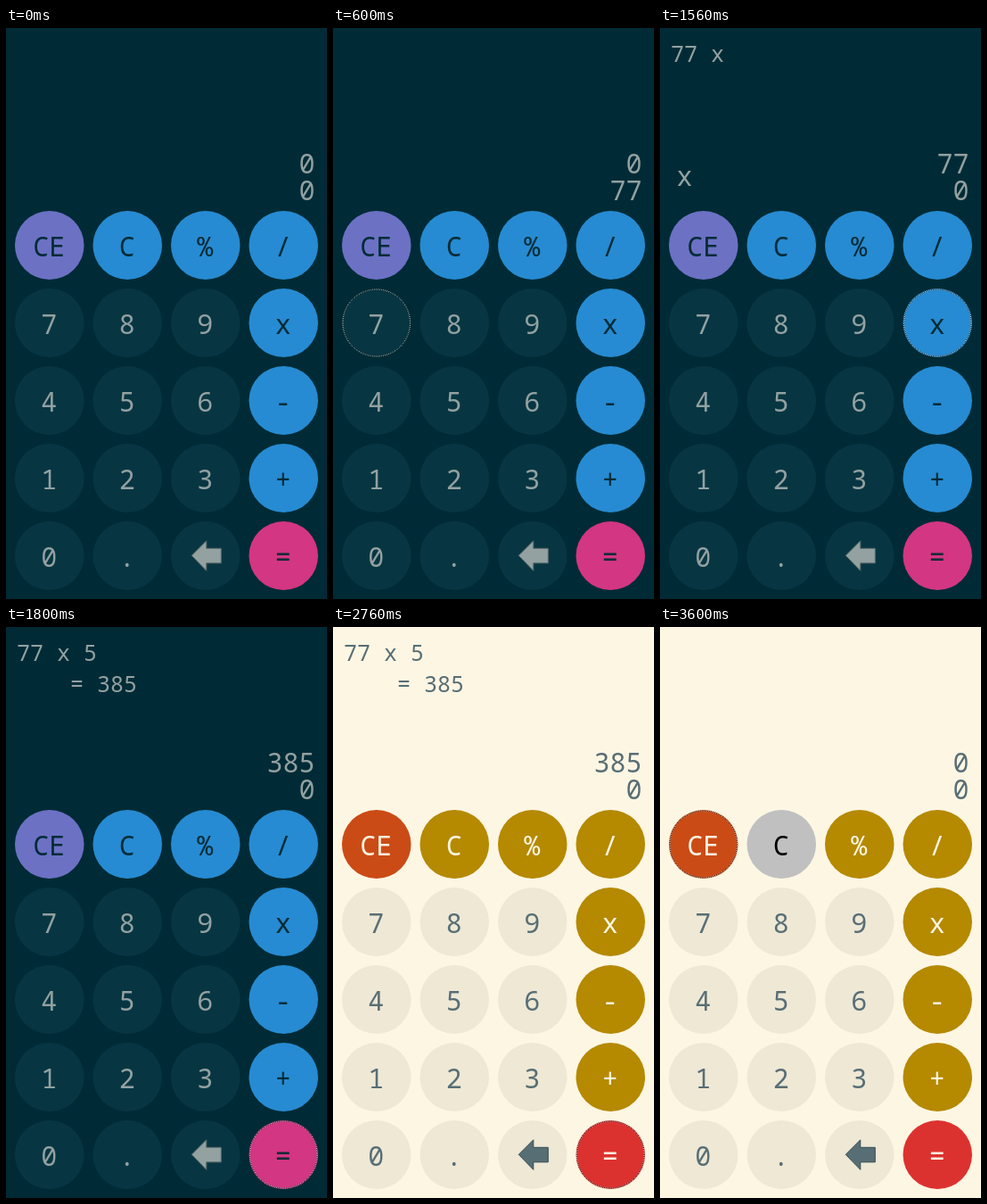
An HTML page for the animation above (4.2 s loop, 360 px wide and 640 px high).

```html
<!DOCTYPE html>
<html lang="en">
<head>
<meta charset="utf-8">
<title>Calculator</title>
<style>
html, body { margin: 0; width: 100%; height: 100%; overflow: hidden; }
svg { display: block; width: 100vw; height: 100vh; }
text { font: 30px "Noto Sans Mono", monospace; white-space: pre; }
.history { font-size: 25px; }
.mid { text-anchor: middle; }
.end { text-anchor: end; }
.ring { fill: none; stroke-width: 1; stroke-dasharray: 1 1; }
</style>
</head>
<body>
<svg id="stage" viewBox="0 0 360 640"></svg>
<script>
const STEP = 600;
const RX = 38.75, RY = 38.5;
const KEYS = ['CE', 'C', '%', '/', '7', '8', '9', 'x', '4', '5', '6', '-',
              '1', '2', '3', '+', '0', '.', 'back', '='];

const dark = {
  page: '#002b36', pad: '#073642', ink: '#93a1a1', label: '#002b36',
  op: '#268bd2', clear: '#6c71c4', equals: '#d33682', edge: '#5d6a6b'
};
const light = {
  page: '#fdf6e3', pad: '#eee8d5', ink: '#586e75', label: '#fdf6e3',
  op: '#b58900', clear: '#cb4b16', equals: '#dc322f', edge: '#344b52'
};

const sum = ['77 x 5', '    = 385'];
const states = [
  { theme: dark, total: '0', entry: '0' },
  { theme: dark, total: '0', entry: '77', focus: '7' },
  { theme: dark, total: '77', entry: '0', focus: 'x', pending: 'x', history: ['77 x'] },
  { theme: dark, total: '385', entry: '0', focus: '=', history: sum },
  { theme: light, total: '385', entry: '0', focus: '=', history: sum },
  { theme: light, total: '385', entry: '0', history: sum, padHidden: true },
  { theme: light, total: '0', entry: '0', focus: 'CE', pressed: 'C' }
];

const stage = document.getElementById('stage');

function add(parent, tag, attrs, content) {
  const el = document.createElementNS('http://www.w3.org/2000/svg', tag);
  for (const name in attrs) el.setAttribute(name, attrs[name]);
  if (content) el.textContent = content;
  parent.appendChild(el);
  return el;
}

const page = add(stage, 'rect', { width: 360, height: 640 });
const history = [38, 73].map(y => add(stage, 'text', { x: 12, y, class: 'history' }));
const readout = add(stage, 'g', {});
const pending = add(readout, 'text', { x: 27.5, y: 177, class: 'mid' });
const total = add(readout, 'text', { x: 346.5, y: 163, class: 'end' });
const entry = add(readout, 'text', { x: 346.5, y: 193, class: 'end' });
const pad = add(stage, 'g', {});

const buttons = KEYS.map((key, i) => {
  const cx = 48.75 + 87.5 * (i % 4);
  const cy = 243.5 + 87 * Math.floor(i / 4);
  const disc = add(pad, 'ellipse', { cx, cy, rx: RX, ry: RY });
  const face = key === 'back'
    ? add(pad, 'path', {
        d: `M${cx - 15.5} ${cy - .2}l16.5-16.5v8.5h16.5v16.5h-16.5v8.5z`, 'stroke-width': 1
      })
    : add(pad, 'text', { x: cx - .4, y: cy + 12, class: 'mid' }, key);
  return { key, cx, cy, disc, face };
});

const ring = add(pad, 'g', { class: 'ring' });
const dashes = [['#fff', 1.5], ['#000', .5]].map(([stroke, offset]) =>
  add(ring, 'ellipse', { rx: RX - 1, ry: RY - 1, stroke, 'stroke-dashoffset': offset }));

function discColor(key, theme) {
  if (key === 'CE') return theme.clear;
  if (key === '=') return theme.equals;
  return /^[C%\/x+-]$/.test(key) ? theme.op : theme.pad;
}

function show(state) {
  const { theme } = state;
  page.setAttribute('fill', theme.page);
  history.forEach((line, i) => {
    line.textContent = (state.history || [])[i] || '';
    line.setAttribute('fill', theme.ink);
  });
  readout.setAttribute('fill', theme.ink);
  readout.setAttribute('transform', `translate(0 ${state.padHidden ? 435 : 0})`);
  pending.textContent = state.pending || '';
  total.textContent = state.total;
  entry.textContent = state.entry;
  pad.setAttribute('display', state.padHidden ? 'none' : 'inline');
  ring.setAttribute('display', state.focus ? 'inline' : 'none');

  for (const { key, cx, cy, disc, face } of buttons) {
    const color = discColor(key, theme);
    const pressed = key === state.pressed;
    disc.setAttribute('fill', pressed ? '#c0c0c0' : color);
    face.setAttribute('fill', pressed ? '#000' : color === theme.pad ? theme.ink : theme.label);
    if (key === 'back') face.setAttribute('stroke', theme.edge);
    if (key === state.focus) {
      for (const dash of dashes) {
        dash.setAttribute('cx', cx);
        dash.setAttribute('cy', cy);
      }
    }
  }
}

let shown = -1;
function tick(now) {
  const index = Math.floor(now / STEP) % states.length;
  if (index !== shown) show(states[shown = index]);
}

const start = performance.now();
function loop() {
  tick(performance.now() - start);
  requestAnimationFrame(loop);
}
loop();
</script>
</body>
</html>
```
